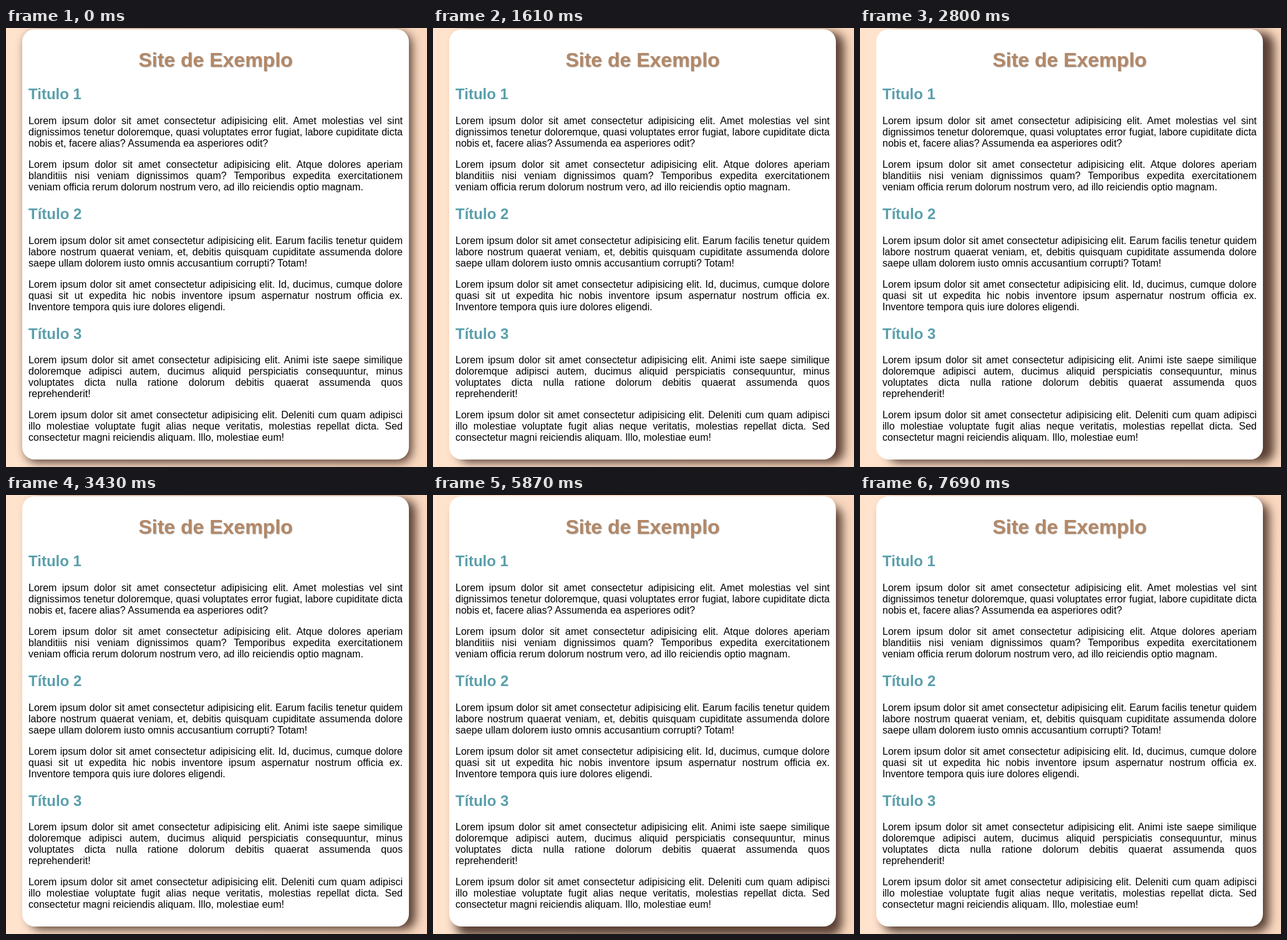
Recreate the animation shown at these times as an HTML page. Size 675 px wide and 703 px high, loop 8.09 s.

```html
<!DOCTYPE html>
<html lang="pt-BR">
<head>
<meta charset="utf-8">
<title>Site de Exemplo</title>
<style>
  html, body { margin: 0; width: 100%; height: 100%; overflow: hidden; }
  body {
    position: relative;
    background: linear-gradient(to right, #ffe3cd, #fad8bf);
    font: 16px/18px Arial, "Liberation Sans", sans-serif;
    color: #000;
  }
  #card {
    position: absolute;
    box-sizing: border-box;
    left: 26px;
    top: 2px;
    width: 620px;
    height: 689px;
    padding: 10px;
    border-radius: 20px;
    background: #fff;
  }
  h1 {
    margin: 21.44px 0;
    font-size: 32px;
    line-height: 37px;
    text-align: center;
    color: #b38867;
    text-shadow: 1px 1px 1px rgba(0, 0, 0, .3);
  }
  h2 { margin: 19.92px 0; font-size: 24px; line-height: 28px; color: #599fab; }
  p { margin: 16px 0; }
  p span { display: block; white-space: nowrap; text-align: justify; text-align-last: justify; }
  p span:last-child { text-align-last: left; }
</style>
</head>
<body>
<main id="card"><h1>Site de Exemplo</h1></main>
<script>
const sections = [
  ["Titulo 1",
    `Lorem ipsum dolor sit amet consectetur adipisicing elit. Amet molestias vel sint
dignissimos tenetur doloremque, quasi voluptates error fugiat, labore cupiditate dicta
nobis et, facere alias? Assumenda ea asperiores odit?`,
    `Lorem ipsum dolor sit amet consectetur adipisicing elit. Atque dolores aperiam
blanditiis nisi veniam dignissimos quam? Temporibus expedita exercitationem
veniam officia rerum dolorum nostrum vero, ad illo reiciendis optio magnam.`],
  ["Título 2",
    `Lorem ipsum dolor sit amet consectetur adipisicing elit. Earum facilis tenetur quidem
labore nostrum quaerat veniam, et, debitis quisquam cupiditate assumenda dolore
saepe ullam dolorem iusto omnis accusantium corrupti? Totam!`,
    `Lorem ipsum dolor sit amet consectetur adipisicing elit. Id, ducimus, cumque dolore
quasi sit ut expedita hic nobis inventore ipsum aspernatur nostrum officia ex.
Inventore tempora quis iure dolores eligendi.`],
  ["Título 3",
    `Lorem ipsum dolor sit amet consectetur adipisicing elit. Animi iste saepe similique
doloremque adipisci autem, ducimus aliquid perspiciatis consequuntur, minus
voluptates dicta nulla ratione dolorum debitis quaerat assumenda quos
reprehenderit!`,
    `Lorem ipsum dolor sit amet consectetur adipisicing elit. Deleniti cum quam adipisci
illo molestiae voluptate fugit alias neque veritatis, molestias repellat dicta. Sed
consectetur magni reiciendis aliquam. Illo, molestiae eum!`],
];

const card = document.getElementById("card");

function add(parent, tag, text = "") {
  const node = document.createElement(tag);
  node.textContent = text;
  return parent.appendChild(node);
}

for (const [title, ...paragraphs] of sections) {
  add(card, "h2", title);
  for (const text of paragraphs) {
    const p = add(card, "p");
    text.split("\n").forEach(line => add(p, "span", line));
  }
}

const LOOP = 8090;
const BURST = 90;
const REST = 5;

const sweepX = { start: 690, period: 380, rise: 5, fall: 3, peak: 19, end: 10 };
const sweepY = { start: 4930, period: 335, rise: 4, fall: 5, peak: 18, end: 9 };

const lerp = (a, b, u) => a + (b - a) * u;

// The offset moves in short bursts with pauses: up evenly to the peak, then down with an ease-in.
function offsetAt({ start, period, rise, fall, peak, end }, t) {
  const elapsed = Math.max(0, t - start);
  const bursts = Math.floor(elapsed / period) + Math.min(1, (elapsed % period) / BURST);
  const down = Math.min(1, (bursts - rise) / fall);
  return Math.round(bursts < rise ? lerp(REST, peak, bursts / rise) : lerp(peak, end, down ** 2));
}

function draw() {
  const t = performance.now() % LOOP;
  const x = offsetAt(sweepX, t);
  const y = offsetAt(sweepY, t);
  card.style.boxShadow = `${x}px ${y}px 15px rgba(35, 14, 6, .75)`;
  requestAnimationFrame(draw);
}
draw();
</script>
</body>
</html>
```
